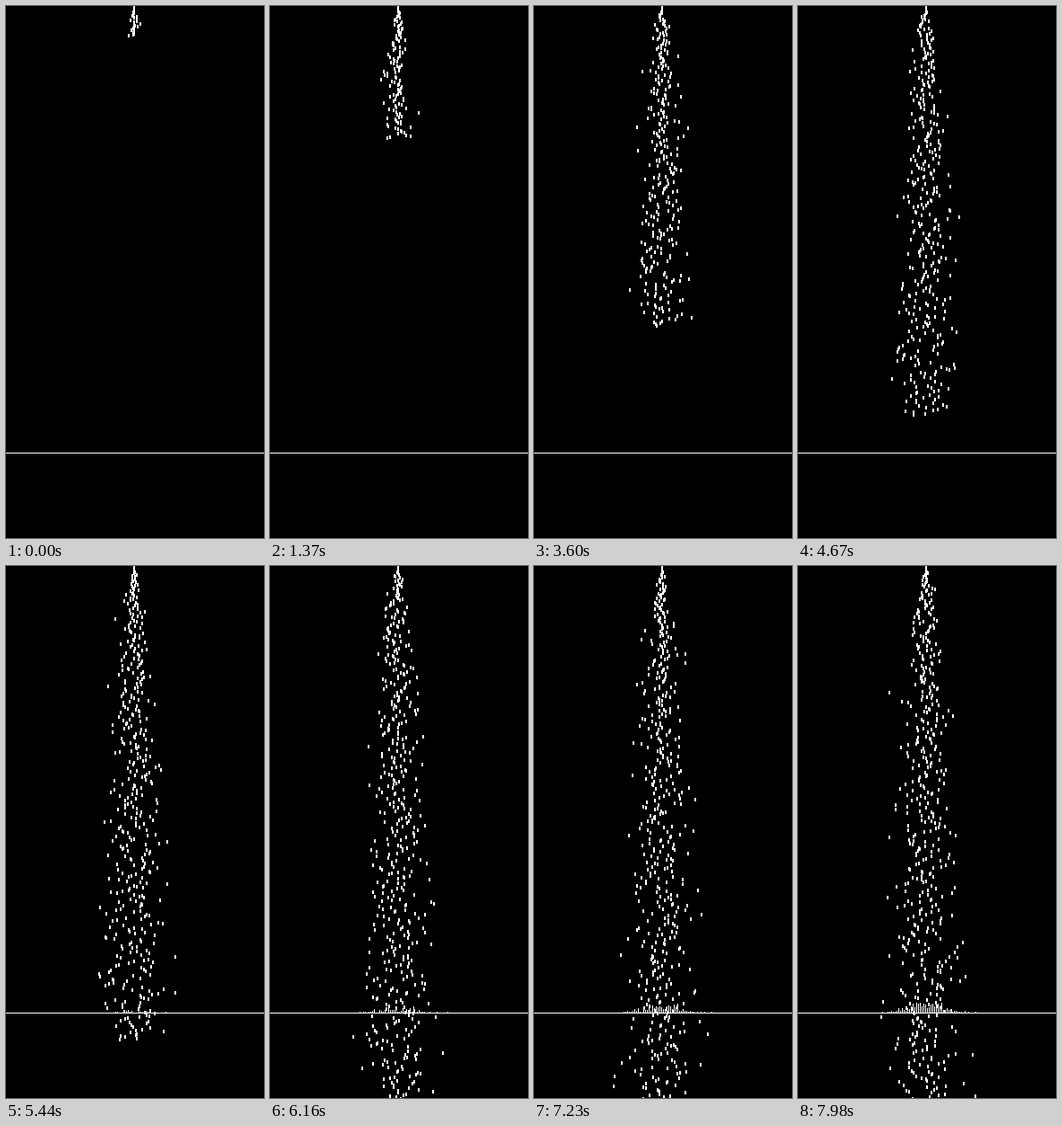
Animation, 288 px wide and 592 px high, one loop 8 s. Source, as an HTML page with a canvas:

```html
<!DOCTYPE html>
<html lang="en">
<head>
<meta charset="utf-8">
<title>Falling random walk</title>
<style>
  html, body { margin: 0; width: 100%; height: 100%; overflow: hidden; background: #000; }
  canvas { display: block; }
</style>
</head>
<body>
<canvas id="stage" width="288" height="592"></canvas>
<script>
const LOOP = 8000, WIDTH = 288, HEIGHT = 592;
const ORIGIN_X = 142, ORIGIN_Y = 4, FLOOR_Y = 497;
const DROP = 1.24, SWAY = 1;
const DOT_W = 2, DOT_H = 4;
const ctx = document.getElementById('stage').getContext('2d');

function seededRandom(seed) {
  return () => {
    seed = (seed + 0x6d2b79f5) | 0;
    let v = Math.imul(seed ^ (seed >>> 15), 1 | seed);
    v = (v + Math.imul(v ^ (v >>> 7), 61 | v)) ^ v;
    return ((v ^ (v >>> 14)) >>> 0) / 4294967296;
  };
}

// Lower edge of the falling front; it speeds up after a slower start.
const frontAt = t => t < 810 ? 35 + 62 * t / 810 : 97 + 0.0931 * (t - 810);
// Two drops are released together, so the picture advances two ticks at a time.
const tickAt = t => 2 * Math.round((frontAt(t) - ORIGIN_Y - DOT_H) / DROP / 2);

const maxAge = Math.ceil((HEIGHT - ORIGIN_Y) / DROP);
const hitAge = Math.ceil((FLOOR_Y - ORIGIN_Y - DOT_H) / DROP);
const random = seededRandom(29);
const walks = Array.from({ length: tickAt(LOOP) + 1 }, () => {
  const walk = new Int16Array(maxAge + 1);
  for (let age = 1; age <= maxAge; age++) {
    walk[age] = walk[age - 1] + (random() < 0.5 ? -SWAY : SWAY);
  }
  return walk;
});

function draw(t) {
  const tick = tickAt(t);
  const hits = new Map();
  ctx.fillStyle = '#000';
  ctx.fillRect(0, 0, WIDTH, HEIGHT);

  ctx.fillStyle = '#fff';
  ctx.fillRect(0, FLOOR_Y, WIDTH, 1);
  ctx.fillRect(ORIGIN_X, 0, DOT_W, 8);

  walks.forEach((walk, born) => {
    const age = tick - born;
    if (age < 0) return;
    if (age >= hitAge) {
      const column = walk[hitAge];
      hits.set(column, (hits.get(column) || 0) + 1);
    }
    if (age <= maxAge) {
      ctx.fillRect(ORIGIN_X + walk[age], Math.round(ORIGIN_Y + age * DROP), DOT_W, DOT_H);
    }
  });

  for (const [column, count] of hits) {
    ctx.fillRect(ORIGIN_X + column + 1, FLOOR_Y - count, 1, count);
  }
}

function frame() {
  draw(performance.now() % LOOP);
  requestAnimationFrame(frame);
}
frame();
</script>
</body>
</html>
```
